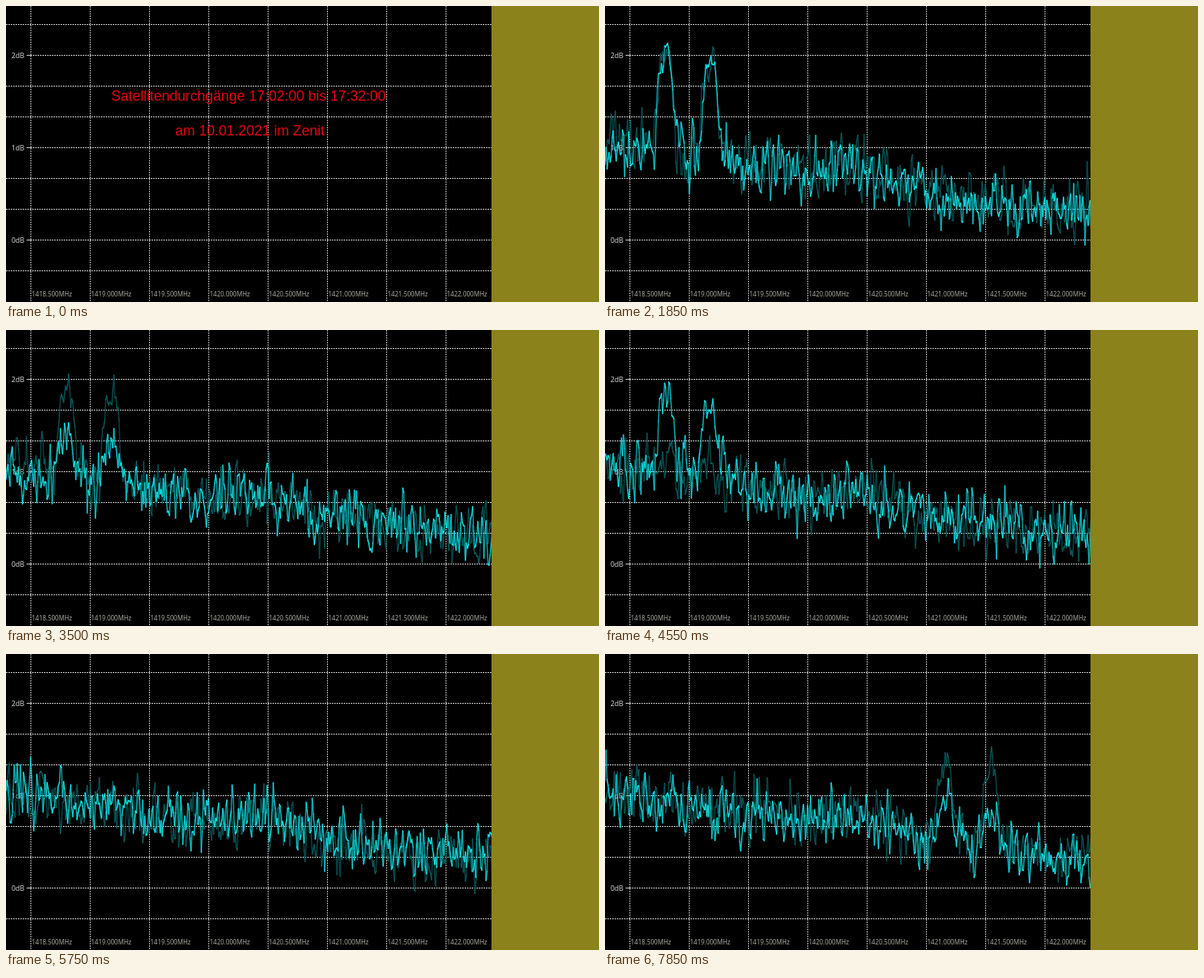
An HTML page with a canvas for the animation above (8000 ms loop, 750 px wide and 375 px high).

```html
<!DOCTYPE html>
<html lang="de">
<head>
<meta charset="utf-8">
<title>Spektrum</title>
<style>
  html, body { margin: 0; width: 100%; height: 100%; overflow: hidden; background: #000; }
  canvas { display: block; }
</style>
</head>
<body>
<canvas id="stage" width="750" height="375"></canvas>
<script>
const ctx = document.getElementById('stage').getContext('2d');
const LOOP = 8000, INTRO = 500, FIRST = 950, STEP = 150;
const W = 750, H = 375, PLOT = 614, DX = 1.3;
const LABEL_FONT = '"Noto Sans", "Open Sans", sans-serif';

// Satellite passes: two lobes that swell from `rise` on and fade between `fall` and `end`
const PASSES = [
  { left: 76, gap: 57, rise: 1100, fall: 3200, end: 3750, peak: 118 },
  { left: 77, gap: 55, rise: 4350, fall: 5200, end: 5620, peak: 155 },
  { left: 430, gap: 57, rise: 6480, fall: 7250, end: 8100, peak: 190 }
];

function smooth(a, b, v) {
  const k = Math.min(1, Math.max(0, (v - a) / (b - a)));
  return k * k * (3 - 2 * k);
}

const bell = (d, width) => Math.exp(-((d / width) ** 2));
const noiseFloor = x => 176 + 0.145 * x - 18 * bell(x - 318, 40);

function level(pass, t) {
  if (t <= pass.rise) return 0;
  return pass.peak * (1 - Math.exp((pass.rise - t) / 230)) * (1 - smooth(pass.fall, pass.end, t));
}

function lobe(d) {
  const body = 0.78 * (1 - smooth(6, 15, d)) + 0.22 * (1 - smooth(12, 27, d));
  return smooth(-15, -6, d) * body + 0.2 * bell(d - 3, 2.5);
}

function random(seed) {
  let s = seed >>> 0;
  return () => {
    s = (s + 0x6D2B79F5) >>> 0;
    let r = Math.imul(s ^ (s >>> 15), s | 1);
    r ^= r + Math.imul(r ^ (r >>> 7), r | 61);
    return ((r ^ (r >>> 14)) >>> 0) / 4294967296;
  };
}

const stepTime = n => n < 1 ? INTRO : FIRST + (n - 1) * STEP;
const traces = new Map();

function trace(n) {
  if (traces.has(n)) return traces.get(n);
  const rnd = random(7919 * (n + 11));
  const gauss = () => (rnd() + rnd() + rnd() - 1.5) * 2;
  const t = stepTime(n), offset = gauss() * 3;
  const points = [];
  let last = gauss();
  for (let x = 0; x <= PLOT + DX; x += DX) {
    const next = gauss();
    let noise = (next + 0.55 * last) * 15.5;
    last = next;
    if (rnd() < 0.018) noise -= 24;
    let signal = 0;
    for (const p of PASSES) {
      signal += level(p, t) * (lobe(x - p.left) + lobe(x - p.left - p.gap));
    }
    points.push([x, noiseFloor(x) + offset - signal + noise / (1 + signal * 0.008)]);
  }
  traces.set(n, points);
  return points;
}

// Steep strokes look dimmer, as on a scope
function drawTrace(points, color) {
  ctx.strokeStyle = color;
  ctx.lineWidth = 1.6;
  ctx.lineCap = 'round';
  for (let i = 1; i < points.length; i++) {
    const [x0, y0] = points[i - 1], [x1, y1] = points[i];
    ctx.globalAlpha = Math.max(0.65, 1 - Math.abs(y1 - y0) / 80);
    ctx.beginPath();
    ctx.moveTo(x0, y0);
    ctx.lineTo(x1, y1);
    ctx.stroke();
  }
  ctx.globalAlpha = 1;
}

function line(x0, y0, x1, y1, color, dash) {
  ctx.strokeStyle = color;
  ctx.lineWidth = 1;
  ctx.lineCap = 'butt';
  ctx.setLineDash(dash);
  ctx.beginPath();
  ctx.moveTo(x0, y0);
  ctx.lineTo(x1, y1);
  ctx.stroke();
  ctx.setLineDash([]);
}

function text(str, x, y, font, color) {
  ctx.font = font;
  ctx.fillStyle = color;
  ctx.fillText(str, x, y);
}

function drawGrid() {
  for (let i = 0; i < 8; i++) {
    const x = 31 + Math.floor(i * 75.1);
    line(x + 0.5, 0, x + 0.5, H, '#bcbcbc', [2, 1]);
    const mhz = (1418.5 + i * 0.5).toFixed(3) + 'MHz';
    text(mhz, x + 1.5, 367.5, '8px ' + LABEL_FONT, '#a8a8a0');
  }
  for (let i = 0; i < 9; i++) {
    const y = 23 + Math.floor(i * 39.1) + 0.5;
    const labelled = i % 3 === 1;
    line(labelled ? 31 : 0, y, PLOT, y, '#d0d0d0', [2, 1]);
    if (labelled) {
      line(26, y, 31, y, '#c8c8c8', []);
      text((7 - i) / 3 + 'dB', 7, y + 3.5, '8.8px ' + LABEL_FONT, '#d4d4d4');
    }
  }
}

function draw(t) {
  ctx.fillStyle = '#000';
  ctx.fillRect(0, 0, W, H);
  drawGrid();
  if (t < INTRO) {
    const font = '18px "Liberation Sans", Arial, sans-serif';
    text('Satellitendurchgänge 17:02:00 bis 17:32:00', 133, 120, font, '#e8000c');
    text('am 10.01.2021 im Zenit', 214, 163.5, font, '#e8000c');
  } else {
    const n = t < FIRST ? 0 : 1 + Math.floor((t - FIRST) / STEP);
    drawTrace(trace(n - 1), '#0a5c5e');
    drawTrace(trace(n), '#12e2e6');
  }
  ctx.fillStyle = '#8b821b';
  ctx.fillRect(PLOT, 0, W - PLOT, H);
}

const start = performance.now();
function tick() {
  draw((performance.now() - start) % LOOP);
  requestAnimationFrame(tick);
}
tick();
</script>
</body>
</html>
```
